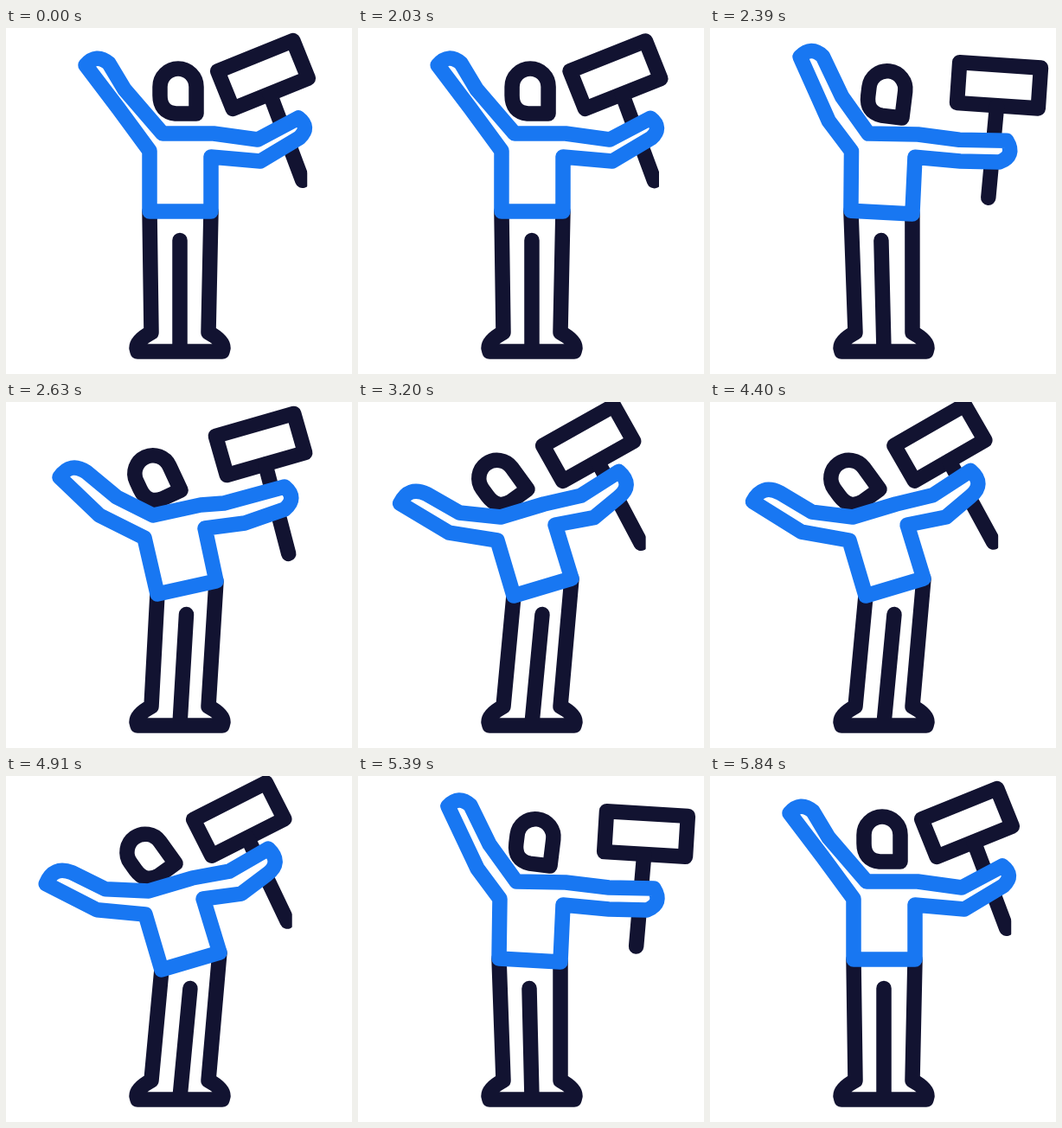
An HTML page that plays this animation: 400x400 px, repeating every 5870 ms.

```html
<!DOCTYPE html>
<html lang="en">
<head>
<meta charset="utf-8">
<title>Protester waving a sign</title>
<style>
  html, body { margin: 0; width: 100%; height: 100%; overflow: hidden; background: #fff; }
  svg { display: block; width: 100vw; height: 100vh; }
  path { fill: none; stroke: #121331; stroke-width: 17.5; stroke-linecap: round; stroke-linejoin: round; }
  #shirt { fill: #fff; stroke: #1877f2; }
</style>
</head>
<body>
<svg viewBox="0 0 400 400">
  <defs><clipPath id="cut"><rect id="cutBox" x="-50" y="-50" width="450" height="500"/></clipPath></defs>
  <path id="legs"/>
  <path id="head" d="M220 99H196Q178 97 178 78V68a21 21 0 0 1 42 0Z"/>
  <path id="board" d="M-47-23.5H47V23.5H-47Z"/>
  <g clip-path="url(#cut)"><path id="stick"/></g>
  <path id="shirt"/>
</svg>
<script>
const LOOP = 5870, START = 2030, STEP = 30;
const $ = id => document.getElementById(id);

// Points: left hem, armpit, elbow, hand, hand, elbow, neck, right shoulder,
// elbow, hand, hand, elbow, armpit, hem, chin, sign centre; then head and sign angles.
const rest = [166,212, 166,142, 130,93, 92,43, 119,41, 137,71, 181,122, 240,122,
  291,129, 338,104, 339,127, 294,154, 237,149, 237,212, 220,99, 297,54, 0,-22];
const rising = [175,222, 160,157, 108,131, 62,87, 93,81, 128,110, 170,131, 225,119,
  252,117, 322,98, 322,124, 276,140, 230,146, 243,207, 202,102, 294,49, -25,-16];
const lean = [180,224, 161,160, 105,155, 46,125, 76,112, 115,131, 165,133, 215,118,
  258,110, 303,84, 301,114, 272,136, 228,142, 247,204, 196,101, 269,50, -36,-27];
const back = [163,211, 164,142, 138,107, 104,35, 130,34, 152,79, 183,122, 240,123,
  290,129, 342,130, 334,155, 290,154, 237,149, 234,215, 222,104, 333,67, 7,3.5];
const peak = back.map((v, i) => v + 0.06 * (v - lean[i]));

const keys = [[2010, rest], [2335, peak], [2630, rising], [2850, lean],
  [4890, lean], [5390, back], [5470, peak], [5840, rest]];

function slope(k, i) {
  if (k < 1 || k > keys.length - 2) return 0;
  const [[t0, a], [t1, b], [t2, c]] = keys.slice(k - 1, k + 2);
  const u = (b[i] - a[i]) / (t1 - t0), v = (c[i] - b[i]) / (t2 - t1);
  return u * v > 0 ? 2 * u * v / (u + v) : 0;
}

function poseAt(t) {
  if (t <= keys[0][0] || t >= keys[keys.length - 1][0]) return rest.slice();
  let k = 0;
  while (t >= keys[k + 1][0]) k++;
  const [t0, a] = keys[k], [t1, b] = keys[k + 1];
  const h = t1 - t0, s = (t - t0) / h, r = 1 - s;
  return a.map((v, i) => v * (1 + 2 * s) * r * r + b[i] * s * s * (3 - 2 * s)
    + h * s * r * (r * slope(k, i) - s * slope(k + 1, i)));
}

function spin(x, y, deg) {
  const a = deg * Math.PI / 180, c = Math.cos(a), s = Math.sin(a);
  return [x * c - y * s, x * s + y * c];
}

// Turns some points of a pose about one of its joints.
function swing(p, joint, ids, deg) {
  const ox = p[joint * 2], oy = p[joint * 2 + 1];
  for (const i of ids) {
    const [x, y] = spin(p[i * 2] - ox, p[i * 2 + 1] - oy, deg);
    p[i * 2] = ox + x;
    p[i * 2 + 1] = oy + y;
  }
}

function bulge([x0, y0], [x1, y1], k) {
  return [(x0 + x1) / 2 + (y1 - y0) * k, (y0 + y1) / 2 - (x1 - x0) * k];
}

function draw(t) {
  const p = poseAt(t);
  if (t > 2850 && t < 4890) {
    const lift = Math.sin((t - 2850) / 2040 * 2 * Math.PI) ** 2;
    swing(p, 1, [2, 3, 4, 5], 5 * lift);
    swing(p, 7, [8, 9, 10, 11, 15], -3 * lift);
    p[33] -= 3 * lift;
  }
  const q = i => [p[i * 2], p[i * 2 + 1]];
  const line = (...ids) => ids.map(i => 'L' + q(i)).join('');

  $('shirt').setAttribute('d', 'M' + q(0) + line(1, 2, 3)
    + 'Q' + bulge(q(3), q(4), 0.5) + ' ' + q(4) + line(5, 6, 7, 8, 9)
    + 'Q' + bulge(q(9), q(10), 0.6) + ' ' + q(10) + line(11, 12, 13) + 'Z');

  const mid = (p[0] + p[26]) / 2 - 0.5;
  $('legs').setAttribute('d', `M${q(0)}L168 352Q151 361 151 370L152 374H250L251 370`
    + `Q251 361 234 352L${q(13)}M${mid} 245.5L201 372`);

  const [hx, hy] = q(14), [sx, sy] = q(15), tilt = p[33];
  $('head').setAttribute('transform', `translate(${hx} ${hy}) rotate(${p[32]}) translate(-220 -99)`);
  $('board').setAttribute('transform', `translate(${sx} ${sy}) rotate(${tilt})`);

  const top = spin(-0.8, 24, tilt), end = spin(-3.4, 130.5, tilt);
  $('stick').setAttribute('d', `M${sx + top[0]} ${sy + top[1]}L${sx + end[0]} ${sy + end[1]}`);
  $('cutBox').setAttribute('width', 50 + sx + end[0] + (tilt < -20 ? 5.5 : 20));
}

const begin = performance.now();
function tick(now) {
  const t = Math.max(0, now - begin) % LOOP;
  draw(t < START ? 0 : START + Math.floor((t - START) / STEP) * STEP);
  requestAnimationFrame(tick);
}
draw(0);
requestAnimationFrame(tick);
</script>
</body>
</html>
```
